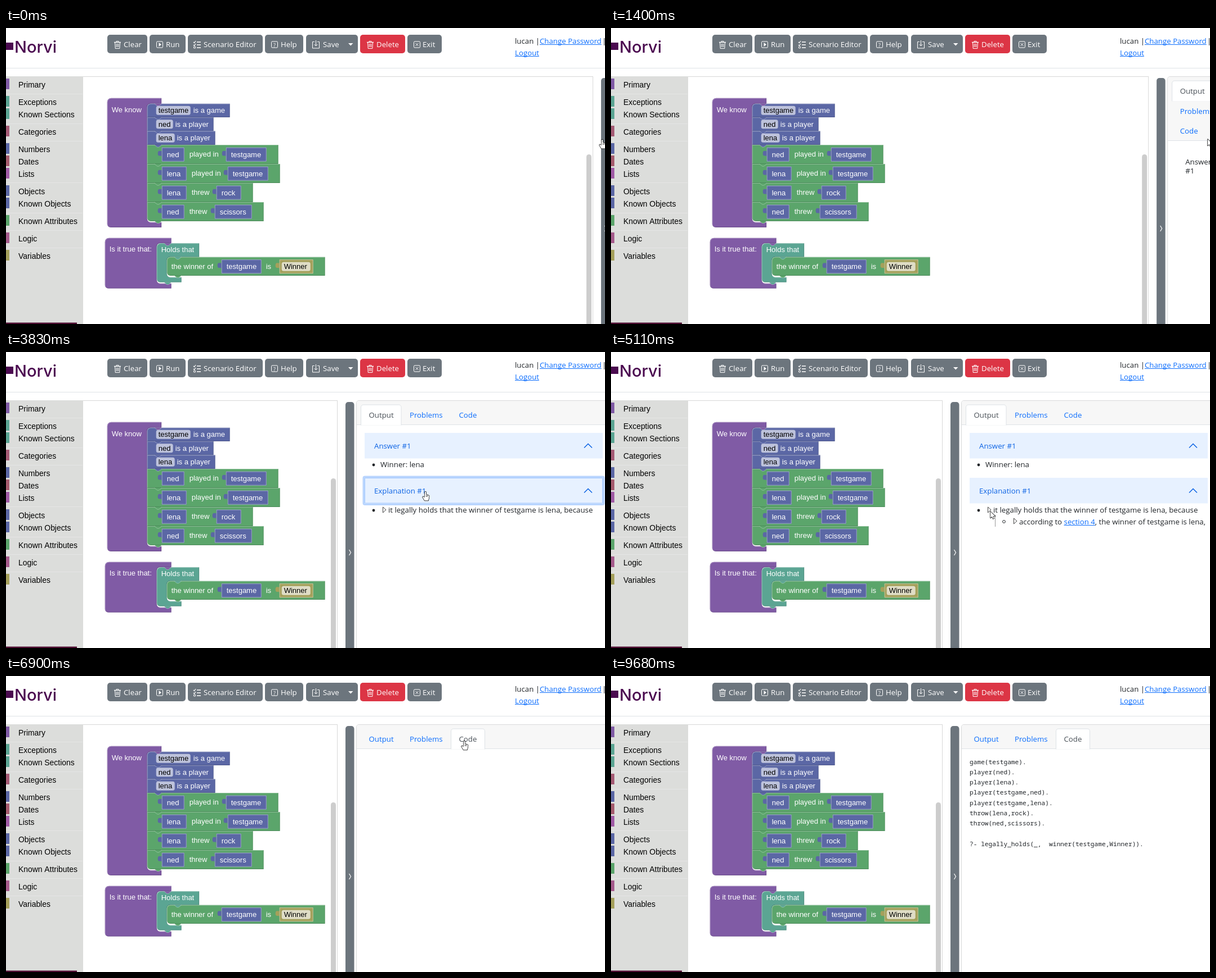
Write an HTML page with a canvas that moves like this. It is 1064x527 px and loops after 9750 ms.

```html
<!DOCTYPE html>
<html lang="en">
<head>
<meta charset="utf-8">
<title>Block editor demo</title>
<style>
html, body { margin: 0; width: 100%; height: 100%; overflow: hidden; background: #fff; }
canvas { display: block; }
</style>
</head>
<body>
<canvas id="stage" width="1064" height="527"></canvas>
<script>
const ctx = document.getElementById('stage').getContext('2d');
const W = 1064, H = 527, LOOP = 9750, STEP = LOOP / 140;
const UI = '13.25px "Open Sans", sans-serif';
const BLOCK = '13px "Liberation Sans", Arial, sans-serif';
const MENU = '13.9px "Liberation Sans", Arial, sans-serif';
const MONO = '11.2px "Noto Sans Mono", monospace';
const PURPLE = '#805ba5', BLUE = '#5b67a5', GREEN = '#5ba56b', TEAL = '#5ba593', OLIVE = '#a5a05b';
const GRAY = '#6c757d', LINK = '#0d6efd', INK = '#212529', LINE = '#dee2e6';

// Moments at which each click takes effect
const CLICK = { bar: 1339, answer: 2575, why: 3618, tree: 5021, problems: 6420, code: 6870 };

const PATH = [
  [0, 1059, 199], [1260, 1059, 199], [1340, 1060, 198], [1960, 1060, 198], [2400, 789, 164],
  [3000, 789, 164], [3450, 745, 249], [4370, 745, 249], [4760, 674, 284], [5450, 674, 284],
  [5880, 745, 178], [6200, 757, 117], [6500, 757, 117], [6780, 814, 116], [8730, 814, 116],
  [9150, 705, 532], [LOOP, 705, 532]
];

const clamp = v => Math.max(0, Math.min(1, v));
const mix = (a, b, k) => a + (b - a) * k;
const between = (t, a, b) => t >= a && t < b;
const smooth = k => k * k * (3 - 2 * k);

// CSS "ease": cubic-bezier(.25, .1, .25, 1)
function ease(x) {
  if (x <= 0 || x >= 1) return clamp(x);
  let lo = 0, hi = 1;
  const curve = (a, b, s) => 3 * a * s * (1 - s) ** 2 + 3 * b * s * s * (1 - s) + s ** 3;
  for (let i = 0; i < 24; i++) {
    const mid = (lo + hi) / 2;
    if (curve(.25, .25, mid) < x) lo = mid; else hi = mid;
  }
  return curve(.1, 1, lo);
}
const slide = (t, start) => ease((t - start) / 350);

function text(str, x, y, font, color) {
  ctx.font = font;
  ctx.fillStyle = color;
  ctx.fillText(str, x, y + 4.6);
  return x + ctx.measureText(str).width;
}
function link(str, x, y) {
  const end = text(str, x, y, UI, LINK);
  ctx.fillRect(x, Math.round(y + 6), end - x, 1);
  return end;
}
function rect(x, y, w, h, color) {
  ctx.fillStyle = color;
  ctx.fillRect(x, y, w, h);
}
function round(x, y, w, h, r, color) {
  ctx.beginPath();
  ctx.roundRect(x, y, w, h, r);
  ctx.fillStyle = color;
  ctx.fill();
}
function poly(points, color, width = 1, close = false) {
  ctx.beginPath();
  points.forEach(([x, y]) => ctx.lineTo(x, y));
  if (close) ctx.closePath();
  ctx.strokeStyle = color;
  ctx.lineWidth = width;
  ctx.stroke();
}
function box(x, y, w, h, r, color) {
  ctx.beginPath();
  ctx.roundRect(x, y, w, h, r);
  ctx.strokeStyle = color;
  ctx.lineWidth = 1;
  ctx.stroke();
}

// ---- toolbar ----
const frameIcon = x => box(x + .5, 24, 11, 11, 1.5, '#fff');
const icons = {
  trash(x) {
    poly([[x, 25.5], [x + 12, 25.5]], '#fff', 1.4);
    poly([[x + 4, 25], [x + 4, 23.5], [x + 8, 23.5], [x + 8, 25]], '#fff');
    poly([[x + 1.5, 26], [x + 2.2, 36.5], [x + 9.8, 36.5], [x + 10.5, 26]], '#fff');
    [4, 6, 8].forEach(d => poly([[x + d, 28], [x + d, 34]], '#fff', .9));
  },
  play(x) {
    frameIcon(x);
    ctx.beginPath();
    ctx.moveTo(x + 4.5, 26); ctx.lineTo(x + 9, 29.5); ctx.lineTo(x + 4.5, 33);
    ctx.fillStyle = '#fff';
    ctx.fill();
  },
  list(x) {
    [25, 30, 35].forEach((y, i) => {
      poly([[x + 6, y], [x + 13, y]], '#fff', 1.5);
      if (i < 2) poly([[x, y], [x + 1.5, y + 1.5], [x + 4, y - 2]], '#fff', 1.2);
      else box(x + .5, y - 2, 3, 3, .5, '#fff');
    });
  },
  help(x) { frameIcon(x); text('?', x + 4, 29, '9px "Open Sans", sans-serif', '#fff'); },
  save(x) {
    poly([[x + 4, 24.5], [x + .5, 24.5], [x + .5, 36], [x + 12.5, 36], [x + 12.5, 24.5], [x + 9, 24.5]], '#fff');
    poly([[x + 6.5, 22], [x + 6.5, 32]], '#fff');
    poly([[x + 3.5, 29], [x + 6.5, 32], [x + 9.5, 29]], '#fff');
  },
  exit(x) {
    frameIcon(x);
    poly([[x + 3.5, 27], [x + 8.5, 32]], '#fff');
    poly([[x + 8.5, 27], [x + 3.5, 32]], '#fff');
  }
};
const BUTTONS = [
  ['Clear', 180, 71, 209, 'trash', 192], ['Run', 255, 64, 284, 'play', 267],
  ['Scenario Editor', 323, 133, 351, 'list', 333], ['Help', 460, 68, 488, 'help', 471],
  ['Save', 533, 92, 563, 'save', 544], ['Delete', 629, 80, 658, 'trash', 641],
  ['Exit', 713, 61, 740, 'exit', 724]
];
function drawHeader() {
  rect(0, 26, 13, 13, '#4b0a50');
  ctx.font = '500 29px Inter, sans-serif';
  ctx.fillStyle = '#4b0a50';
  ctx.fillText('Norvi', 15, 43.5);
  for (const [label, x, w, tx, icon, ix] of BUTTONS) {
    round(x, 12, w, 33, 5, label === 'Delete' ? '#dc3545' : GRAY);
    icons[icon](ix);
    text(label, tx, 29.5, UI, '#fff');
  }
  ctx.beginPath();
  ctx.moveTo(608, 27); ctx.lineTo(616.5, 27); ctx.lineTo(612.2, 31.5);
  ctx.fill();
  text('lucan |', 904, 23, UI, INK);
  link('Change Password', 948, 23);
  text('|', 1059, 23, UI, INK);
  link('Logout', 904, 44);
  rect(0, 71, W, 1, LINE);
}

// ---- sidebar ----
const MENU_ROWS = [
  ['Primary', 101, PURPLE], ['Exceptions', 132, TEAL], ['Known Sections', 154, TEAL],
  ['Categories', 185, '#a55b74'], ['Numbers', 216, BLUE], ['Dates', 238, '#a55b6d'],
  ['Lists', 260, '#a05ba5'], ['Objects', 291, BLUE], ['Known Objects', 313, BLUE],
  ['Known Attributes', 344, GREEN], ['Logic', 375, '#a55b8c'], ['Variables', 406, OLIVE]
];
function drawSidebar() {
  rect(0, 86, 137, H - 86, '#dcdddb');
  [117, 170, 201, 275, 329, 360, 391].forEach(y => rect(0, y, 136, 1, '#e5e5e5'));
  for (const [label, y, color] of MENU_ROWS) {
    rect(0, y - 11, 6, 19, color);
    text(label, 22, y, MENU, '#000');
  }
  rect(0, 524.5, 126, 3, '#4e0d31');
}

// ---- blocks ----
// Lit along the upper left edges, shaded along the lower right ones
function solid(path, color) {
  ctx.fillStyle = color;
  ctx.fill(path);
  ctx.save();
  ctx.clip(path);
  ctx.lineWidth = 1;
  ctx.translate(.5, .5);
  ctx.strokeStyle = 'rgba(255,255,255,.3)';
  ctx.stroke(path);
  ctx.translate(-1, -1);
  ctx.strokeStyle = 'rgba(0,0,0,.16)';
  ctx.stroke(path);
  ctx.restore();
}
function bracket(x, y, topRight, mouth, mouthTop, mouthEnd, end, endRight, color) {
  const p = new Path2D();
  p.moveTo(x, y + 7);
  p.arcTo(x, y, x + 7, y, 7);
  p.lineTo(topRight, y);
  p.lineTo(topRight, mouthTop);
  p.lineTo(mouth + 6, mouthTop);
  p.arcTo(mouth, mouthTop, mouth, mouthTop + 6, 6);
  p.lineTo(mouth, mouthEnd - 6);
  p.arcTo(mouth, mouthEnd, mouth + 6, mouthEnd, 6);
  p.lineTo(endRight, mouthEnd);
  p.lineTo(endRight, end);
  p.lineTo(x + 6, end);
  p.arcTo(x, end, x, end - 6, 6);
  p.closePath();
  solid(p, color);
}
function row(x, y, right, bottom, color, radii = 0) {
  const p = new Path2D();
  p.roundRect(x, y, right - x, bottom - y, radii);
  solid(p, color);
}
function notch(x, y, color) {
  const pts = [[x + 13, y], [x + 18, y + 4], [x + 21, y + 4], [x + 26, y]];
  ctx.beginPath();
  pts.forEach(([a, b]) => ctx.lineTo(a, b));
  ctx.fillStyle = color;
  ctx.fill();
  poly(pts, 'rgba(255,255,255,.3)');
}
const label = (str, x, y) => text(str, x, y, BLOCK, '#fff');
function pill(str, x, y, w, color) {
  round(x, y - 8, w, 16, 3.5, color);
  text(str, x + 4, y, BLOCK, '#000');
}
function value(x, y, w, color, str) {
  const top = y - 12.5;
  ctx.beginPath();
  ctx.moveTo(x, top + 5);
  ctx.bezierCurveTo(x, top + 9, x - 7, top + 2, x - 7, top + 11);
  ctx.bezierCurveTo(x - 7, top + 18, x, top + 12, x, top + 17);
  ctx.fillStyle = color;
  ctx.fill();
  rect(x, top, w, 25, color);
  box(x + .5, top + .5, w - 1, 24, 0, 'rgba(255,255,255,.38)');
  if (str) label(str, x + 9, y);
}

const FACTS = [['testgame', 147, 61, 'is a game', 333, 398], ['ned', 171.5, 30, 'is a player', 301, 369],
  ['lena', 196, 33, 'is a player', 304, 372]];
const MOVES = [['ned', 225, 40, 'played in', 391, 72, 'testgame', 484], ['lena', 259, 44, 'played in', 394, 72, 'testgame', 487],
  ['lena', 293, 44, 'threw', 374, 44, 'rock', 439], ['ned', 327, 40, 'threw', 371, 66, 'scissors', 458]];

function drawBlocks() {
  ctx.save();
  ctx.translate(-.3, -.3);
  bracket(180, 125, 276.5, 251, 135, 346, 355.3, 276.5, PURPLE);
  label('We know', 188, 146);
  FACTS.forEach(([name, y, w, tail, tx, right], i) => {
    const top = 135 + i * 24.4;
    row(251, top, right, top + 24.4, BLUE, i ? 0 : [6, 0, 0, 0]);
    notch(251, top, i ? BLUE : PURPLE);
    pill(name, 267, y, w, '#bdc2db');
    label(tail, tx, y);
  });
  MOVES.forEach(([who, y, w, verb, x, vw, what, right], i) => {
    const top = 208.3 + i * 34;
    row(251, top, right, top + 34, GREEN, i < 3 ? 0 : [0, 0, 0, 6]);
    notch(251, top, i ? GREEN : BLUE);
    value(277, y + .5, w, BLUE, who);
    label(verb, 277 + w + 9, y - .5);
    value(x, y + .5, vw, BLUE, what);
  });
  notch(251, 344, GREEN);

  bracket(176, 374, 294, 268, 383.5, 455, 464, 294, PURPLE);
  label('Is it true that:', 184, 394);
  bracket(268, 383.5, 343.5, 286, 408, 444, 453, 312, TEAL);
  notch(268, 383.5, PURPLE);
  notch(268, 453, TEAL);
  label('Holds that', 276, 395);
  row(286, 408, 567, 441.3, GREEN, [6, 0, 0, 6]);
  notch(286, 408, TEAL);
  notch(286, 441, GREEN);
  label('the winner of', 294, 424.5);
  value(383, 425, 71, BLUE, 'testgame');
  label('is', 462, 424.5);
  value(486, 425, 60, OLIVE);
  pill('Winner', 490, 425, 51, '#dfddc6');
  ctx.restore();
}

// ---- result panel ----
const TABS = [['Output', 72.5], ['Problems', 87.5], ['Code', 61]];
const ROW = 35.5;

function layoutTabs(left) {
  let x = left, y = 94;
  return TABS.map(([name, w]) => {
    if (x > left && x + w > W) { x = left; y += ROW; }
    const tab = { name, x, y, w };
    x += w;
    return tab;
  });
}
function clipped(y, height, draw) {
  if (height <= 0) return;
  ctx.save();
  ctx.beginPath();
  ctx.rect(0, y, W, height);
  ctx.clip();
  draw();
  ctx.restore();
}
function accordion(title, x, y, t, clickAt, focused) {
  const open = t >= clickAt, width = Math.max(1060 - x, 90);
  const k = ease((t - clickAt) / 200);
  if (focused) round(x - 3.5, y - 3.5, width + 7, 52.5, 4, '#b9d5fe');
  rect(x, y, width, 45.5, '#fff');
  ctx.globalAlpha *= ease((t - clickAt) / 150);
  rect(x, y, width, 45.5, '#e7f1ff');
  ctx.globalAlpha = 1;
  if (focused) box(x + .5, y + .5, width - 1, 44.5, 0, '#a5cafe');
  const color = open ? '#0c63e4' : INK, tx = x + 17, cy = y + 23;
  const parts = tx > 960 ? title.split(' ') : [title];
  parts.forEach((s, i) => text(s, tx, cy + i * 16.5, UI, color));
  const cx = Math.max(1034, tx + 53), bend = mix(3.5, -3.5, k), my = cy + (parts.length - 1) * 7;
  poly([[cx - 7, my - bend], [cx, my + bend], [cx + 7, my - bend]], color, 1.5);
}
function bullet(x, y, hollow) {
  ctx.beginPath();
  ctx.arc(x, y, 2.4, 0, 7);
  ctx.fillStyle = ctx.strokeStyle = INK;
  ctx.lineWidth = 1;
  hollow ? ctx.stroke() : ctx.fill();
}
function marker(x, y, open) {
  poly(open ? [[x - 5, y - 3], [x + 5, y - 3], [x, y + 4]] : [[x - 2.5, y - 5], [x + 3, y], [x - 2.5, y + 5]], '#444', 1, true);
}
function drawTree() {
  rect(682, 290, 1, 84, '#9a9a9a');
  bullet(698, 302, true);
  marker(718, 301, false);
  let x = text('according to ', 725, 302, UI, INK);
  x = link('section 4', x, 302);
  text(', the winner of testgame is lena,', x, 302, UI, INK);
  text('because', 711, 323, UI, INK);
  bullet(698, 344, true);
  marker(718, 343, false);
  text('there is no evidence that the conclusion in section 4 is', 725, 344, UI, INK);
  text('defeated, because', 711, 365, UI, INK);
}
function drawOutput(t, px, shift) {
  const x = px + 15;
  accordion('Answer #1', x, 144 + shift, t, CLICK.answer, between(t, 2420, 3460));
  if (t < CLICK.answer) return;
  clipped(189.5, 85 * slide(t, CLICK.answer) + (t > 2930 ? 300 : 0), () => {
    bullet(653, 201);
    text('Winner: lena', 665, 200.5, UI, INK);
    rect(x, 224, 1060 - x, 1, LINE);
    accordion('Explanation #1', x, 224, t, CLICK.why, between(t, 3460, 4960));
    clipped(270, 22 * slide(t, CLICK.why) + (t > 3970 ? 120 : 0), () => {
      bullet(653, 282);
      marker(672, 281, t > CLICK.tree + 350);
      text('it legally holds that the winner of testgame is lena, because', 679, 281, UI, INK);
      clipped(290, 84 * slide(t, CLICK.tree), drawTree);
    });
  });
}
const CODE = ['game(testgame).', 'player(ned).', 'player(lena).', 'player(testgame,ned).', 'player(testgame,lena).',
  'throw(lena,rock).', 'throw(ned,scissors).', '', '?- legally_holds(_,  winner(testgame,Winner)).'];

function drawPanel(t, px, pointer) {
  if (px >= W) return;
  const tabs = layoutTabs(px + 8);
  const shift = tabs[2].y - 94, base = 129.5 + shift;
  const active = t < CLICK.problems ? 0 : t < CLICK.code ? 1 : 2;
  round(px, 86, W - px + 20, H, 5, '#d9dadb');
  round(px + 1, 87, W - px + 20, H, 4, '#fff');
  round(px + 1, 87, W - px + 20, base - 87, [4, 0, 0, 0], '#f7f7f7');
  rect(px + 1, base - .5, W - px, 1, LINE);
  tabs.forEach(({ name, x, y, w }, i) => {
    const hover = pointer.x > x && pointer.x < x + w && pointer.y > y && pointer.y < y + ROW;
    if (i === active) {
      round(x, y - .5, w, ROW + 1.5, [5, 5, 0, 0], LINE);
      round(x + 1, y + .5, w - 2, ROW + .5, [4, 4, 0, 0], '#fff');
    } else if (hover) {
      box(x + .5, y, w - 1, ROW, [5, 5, 0, 0], '#e9ecef');
    }
    text(name, x + 14.5, y + 18.5, UI, i === active ? '#495057' : LINK);
  });
  if (active === 0) drawOutput(t, px, shift);
  ctx.globalAlpha = clamp((t - 7200) / 200);
  if (active === 2) CODE.forEach((line, i) => text(line, 637, 152 + i * 18.27, MONO, INK));
  ctx.globalAlpha = 1;
}

// ---- pointer ----
function pointerAt(t) {
  const i = PATH.findIndex(k => k[0] > t);
  const [t0, x0, y0] = PATH[i - 1], [t1, x1, y1] = PATH[i];
  const k = smooth((t - t0) / (t1 - t0));
  return { x: mix(x0, x1, k), y: mix(y0, y1, k) };
}
const ARROW = [[0, 0], [0, 11.5], [2.7, 9], [4.5, 13], [6.3, 12.2], [4.6, 8.4], [8.3, 8.2]];
const HAND = [[-1, 0], [1, 0], [1.3, 5], [5, 6], [6.5, 7], [6.3, 11], [5, 15.5], [-1.5, 15.5], [-5, 9.5], [-4, 8.3], [-1.5, 10]];

function drawPointer(t, { x, y }) {
  if (Object.values(CLICK).some(c => between(t, c - 160, c - 10))) {
    const glow = ctx.createRadialGradient(x, y + 2, 4, x, y + 2, 10);
    glow.addColorStop(0, 'rgba(255,245,40,.7)');
    glow.addColorStop(1, 'rgba(255,245,40,0)');
    rect(x - 11, y - 9, 22, 22, glow);
  }
  const onHeader = t > 1700 && t < CLICK.problems && x > 637 &&
    (between(y, 144, 190) || (t > CLICK.answer && between(y, 224, 270)));
  const hand = t < CLICK.bar || onHeader || (t > 1700 && between(y, 94, 130));
  ctx.save();
  ctx.translate(x, y);
  ctx.lineJoin = 'round';
  poly(hand ? HAND : ARROW, '#000', 1.4, true);
  ctx.fillStyle = '#fff';
  ctx.fill();
  if (hand) [1.5, 3.6].forEach(d => poly([[d, 6], [d, 9]], '#222', .8));
  ctx.restore();
}

function draw(t) {
  const bar = mix(1057, 603, slide(t, CLICK.bar));
  const pointer = pointerAt(t);
  rect(0, 0, W, H, '#fff');
  drawHeader();
  drawSidebar();
  rect(137, 86, bar - 151, 1, '#d8d8d8');
  rect(bar - 15, 86, 1, H, '#d8d8d8');
  drawBlocks();
  round(bar - 26, 225, 9, H, 4.5, '#cdcdcd');
  round(bar, 89, 15.5, H, 5, GRAY);
  poly([[bar + 6.5, 352], [bar + 9.5, 357], [bar + 6.5, 362]], '#fff', 1.2);
  drawPanel(t, bar + 19, pointer);
  drawPointer(t, pointer);
}

const began = performance.now();
function tick() {
  const t = (performance.now() - began) % LOOP;
  draw(Math.floor(t / STEP) * STEP);
  requestAnimationFrame(tick);
}
tick();
</script>
</body>
</html>
```
